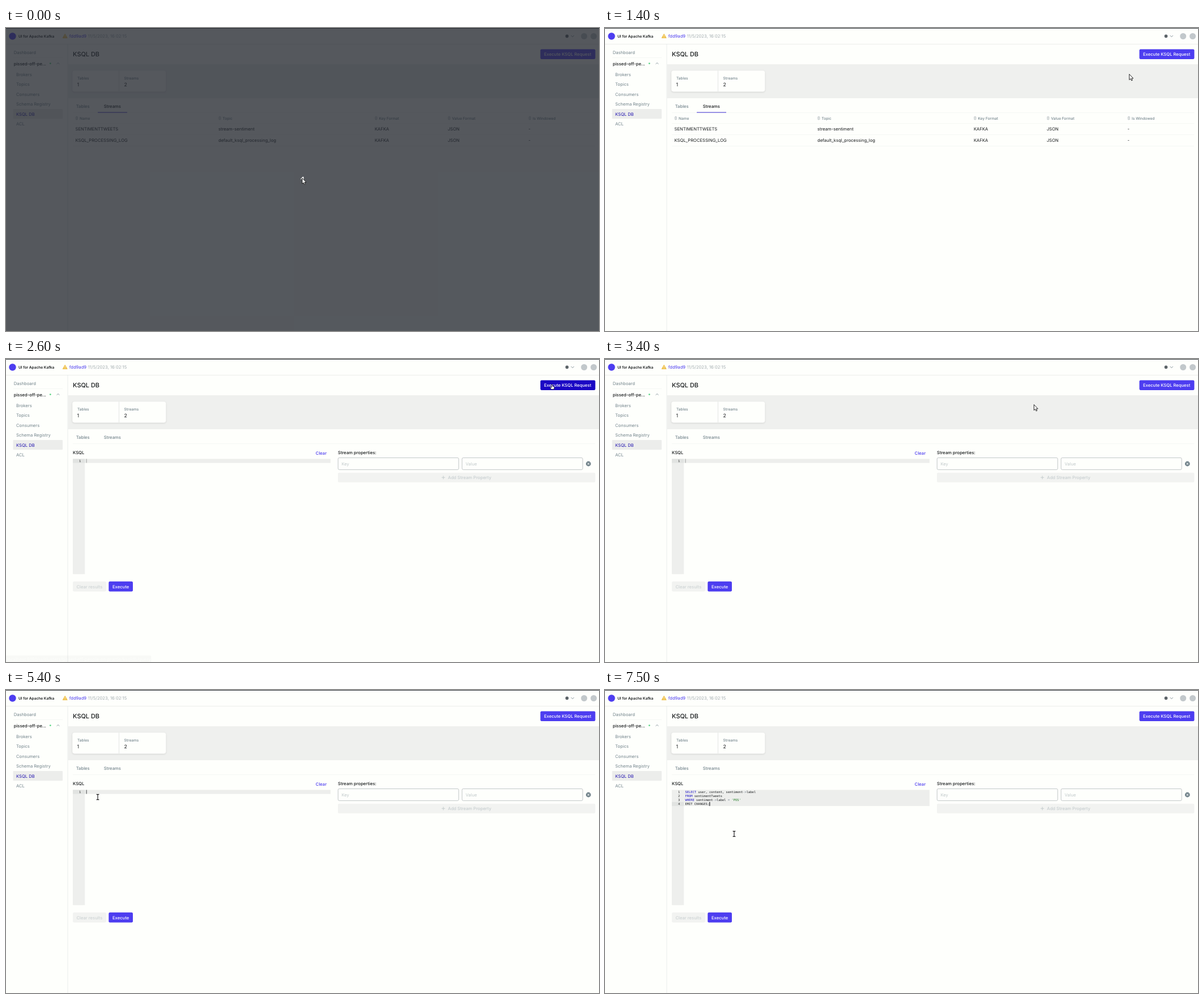
These frames come from a looping animation (1047x535 px, 8000 ms). An HTML page:

```html
<!DOCTYPE html>
<html lang="en">
<head>
<meta charset="utf-8">
<title>KSQL DB</title>
<style>
  html, body { margin: 0; width: 100%; height: 100%; overflow: hidden; background: #fefffc; }
  svg { display: block; width: 1047px; height: 535px; }
  text { font-family: Inter, sans-serif; text-rendering: geometricPrecision; white-space: pre; }
  .mono { font-family: "DejaVu Sans Mono", monospace; font-size: 5.46px; }
  .status { font-family: "Noto Sans", sans-serif; font-size: 7.9px; }
</style>
</head>
<body>
<svg id="stage" viewBox="0 0 1047 535" xmlns="http://www.w3.org/2000/svg"></svg>
<script>
const LOOP = 8000, STEP = 100, SCALE = 0.5453;
const INK = '#171a1c', GREY = '#73848c', BRAND = '#4d3df0', BRAND_DARK = '#1a08c4',
      PAPER = '#fefffc', PANEL = '#eff0ee', LINE = '#e6e9e8', FAINT = '#f1f3f1';

// px is the CSS size on the full-size page; cy is the middle of the capitals
const text = (x, cy, str, color = INK, px = 14, weight = 400) => {
  const size = px * SCALE;
  return `<text x="${x}" y="${(cy + size * 0.364).toFixed(2)}" font-size="${size.toFixed(2)}" font-weight="${weight}" fill="${color}">${str}</text>`;
};
const rect = (x, y, w, h, fill, r = 0, extra = '') =>
  `<rect x="${x}" y="${y}" width="${w}" height="${h}" rx="${r}" fill="${fill}" ${extra}/>`;
const circle = (x, y, r, fill) => `<circle cx="${x}" cy="${y}" r="${r}" fill="${fill}"/>`;
const path = (d, stroke, width = 0.8, fill = 'none', extra = '') =>
  `<path d="${d}" stroke="${stroke}" stroke-width="${width}" fill="${fill}" ${extra}/>`;
const group = (id, body) => `<g id="${id}">${body}</g>`;

function header() {
  return rect(0, 0, 1047, 1, '#34383c') +
    rect(0, 28, 1047, 0.8, LINE) +
    circle(11.5, 14.5, 6.2, BRAND) +
    text(22, 14.5, 'UI for Apache Kafka', INK, 12, 600) +
    path('M104.2 10.6L108.2 17.6H100.2Z', '#f0c24e', 1, '#f0c24e', 'stroke-linejoin="round"') +
    path('M104.2 12.7V15.2M104.2 16V16.8', PAPER, 0.8) +
    text(111.7, 14.7, 'fdd9ad9', BRAND) +
    text(144.7, 14.7, '11/5/2023, 16:02:15', '#a3acb0') +
    circle(990.5, 14.4, 2.8, '#5c6468') +
    path('M997.8 13.2L1000.3 15.7L1002.8 13.2', GREY, 0.9) +
    circle(1020.7, 14.5, 5.5, '#c2c8cb') +
    circle(1037.6, 14.5, 5.5, '#c2c8cb');
}

function sidebar() {
  const items = ['Brokers', 'Topics', 'Consumers', 'Schema Registry', 'KSQL DB', 'ACL'];
  return rect(108.6, 28, 0.8, 507, LINE) +
    text(13.7, 43, 'Dashboard', GREY) +
    rect(13, 52.2, 87, 0.6, FAINT) +
    text(13.7, 63, 'pissed-off-pe...', INK, 14, 500) +
    circle(78.3, 62.6, 1.4, '#5cd685') +
    path('M89.6 63.7L92 61.4L94.4 63.7', GREY, 0.8) +
    rect(12.5, 143, 87.5, 17.2, '#ecedeb', 1) +
    items.map((s, i) => text(18, 82 + i * 17.45, s, s === 'KSQL DB' ? '#1d0fae' : GREY)).join('');
}

function summary() {
  const shadow = 'filter="url(#shadow)"';
  return text(118, 46.3, 'KSQL DB', INK, 20, 500) +
    rect(943.5, 37.4, 97, 17.5, BRAND, 2.2, 'id="request"') +
    text(950, 46.4, 'Execute KSQL Request', '#fff', 14, 500) +
    rect(109.4, 64, 937.6, 60, PANEL) +
    rect(117.3, 75.2, 165, 37, PAPER, 4, shadow) +
    rect(199, 75.2, 1, 37, '#e4e6e4') +
    text(126, 88.5, 'Tables', GREY, 12, 500) + text(125.6, 99.6, '1', INK, 16) +
    text(208.6, 88.5, 'Streams', GREY, 12, 500) + text(208.6, 99.6, '2', INK, 16) +
    rect(118, 149, 922, 0.6, FAINT) +
    text(123.7, 138.6, 'Tables', GREY, 14, 500);
}

function table() {
  const columns = [
    [122.5, 'Name', 'SENTIMENTTWEETS', 'KSQL_PROCESSING_LOG'],
    [375, 'Topic', 'stream-sentiment', 'default_ksql_processing_log'],
    [651, 'Key Format', 'KAFKA', 'KAFKA'],
    [780, 'Value Format', 'JSON', 'JSON'],
    [922.5, 'Is Windowed', '-', '-']
  ];
  const sort = x => path(`M${x + 0.4} 158.1L${x + 2.4} 155.9L${x + 4.4} 158.1Z` +
    `M${x + 0.4} 160.1L${x + 2.4} 162.3L${x + 4.4} 160.1Z`, '#8d999e', 0.6);
  return text(172.8, 138.6, 'Streams', INK, 14, 500) +
    rect(162, 148.5, 52, 1.1, '#4a3bd6') +
    [168, 188.2, 208.4].map(y => rect(118, y, 922, 0.6, FAINT)).join('') +
    columns.map(([x, head, a, b]) => sort(x) +
      text(x + 7.6, 159.2, head, GREY, 12, 500) +
      text(x, 178.3, a) + text(x, 198.5, b)).join('');
}

function codeLine(i, parts) {
  const y = 181.9 + i * 7.09;
  const spans = parts.map(([s, color]) => `<tspan fill="${color}">${s}</tspan>`).join('');
  return `<text class="mono" x="141.4" y="${y}">${spans}</text>` + lineNumber(i);
}
const lineNumber = i =>
  `<text class="mono" x="132.3" y="${181.9 + i * 7.09}" text-anchor="end" fill="#222">${i + 1}</text>`;

function editor() {
  const word = '#1a10c8', op = '#687687';
  const query = [
    [['SELECT', word], [' user, content, sentiment', INK], ['-&gt;', op], ['label', INK]],
    [['FROM', word], [' sentimentTweets', INK]],
    [['WHERE', word], [' sentiment', INK], ['-&gt;', op], ['label ', INK], ['=', op], [" 'POS'", '#1c7a1f']],
    [['EMIT CHANGES;', INK]]
  ];
  return text(172.8, 138.6, 'Streams', GREY, 14, 500) +
    text(118, 164.8, 'KSQL', INK, 14, 500) +
    text(546.8, 165.8, 'Clear', BRAND, 14, 500) +
    rect(118, 176.4, 21.3, 203.4, '#eeefed') +
    rect(139.3, 176.4, 433.7, 7.1, '#edeeec', 0, 'id="active"') +
    group('empty', rect(118, 176.4, 21.3, 7.1, '#e1e3e1') + lineNumber(0)) +
    group('query', rect(118, 197.7, 21.3, 7.1, '#e1e3e1') + query.map((p, i) => codeLine(i, p)).join('')) +
    rect(0, 0, 0.8, 7, INK, 0, 'id="caret"') +
    rect(118, 392.8, 59, 17.6, '#f2f3f1', 2.2) +
    text(124.4, 402, 'Clear results', '#cdd3d4', 14, 500) +
    rect(181.3, 392.8, 42.7, 17.6, BRAND, 2.2) +
    text(188, 402, 'Execute', '#fff', 14, 500);
}

function properties() {
  const field = (x, hint) =>
    rect(x, 174.4, 213, 21, PAPER, 2.2, 'stroke="#b3b9bb" stroke-width=".8"') +
    text(x + 6.2, 185.2, hint, '#c1c9cb');
  return text(586, 164.8, 'Stream properties:', INK, 14, 500) +
    field(586.3, 'Key') + field(805.2, 'Value') +
    circle(1028.3, 185, 4.4, GREY) +
    path('M1026.6 183.3L1030 186.7M1030 183.3L1026.6 186.7', '#fff', 1) +
    rect(586, 200.7, 454.4, 17, '#f2f3f1', 2.2) +
    path('M769.2 209.2H775.2M772.2 206.2V212.2', '#c1c9cb', 0.9) +
    text(780.3, 209.4, 'Add Stream Property', '#c6cdcf', 14, 500);
}

function pointers() {
  const beam = 'M-2.3 -4.6H-.7L0 -4L.7 -4.6H2.3M0 -4V4M-2.3 4.6H-.7L0 4L.7 4.6H2.3';
  return group('arrow', path('M0 0V10L2.3 8L3.9 11.4L5.5 10.7L4 7.4H7Z', '#111', 0.9, '#fff', 'stroke-linejoin="round"')) +
    group('hand', path('M-.9 .4Q0 -.5 .9 .4V3.2L3.2 3.7Q4.2 4 4.1 5L3.5 8.6H-1.2L-3.2 5.4Q-3 4.2 -1.9 4.8L-.9 5.6Z',
      '#111', 0.7, '#fff', 'stroke-linejoin="round"')) +
    group('beam', path(beam, '#fff', 2.2) + path(beam, '#111', 1.1));
}

const stage = document.getElementById('stage');
stage.innerHTML =
  `<defs><filter id="shadow" x="-10%" y="-30%" width="120%" height="170%">
    <feDropShadow dx="0" dy="1" stdDeviation="1.6" flood-color="#000" flood-opacity=".14"/></filter></defs>` +
  rect(0, 0, 1047, 535, PAPER) + header() + sidebar() + summary() +
  group('table', table()) +
  group('form', editor() + properties()) +
  group('status', rect(-3, 523.4, 259.4, 15, '#2f3236', 2) +
    '<text class="status" x="1.5" y="532.6" fill="#f0f0f0">localhost:8080/ui/clusters/pissed-off-people-on-prattlo/ksqldb/query</text>') +
  group('dim', rect(0, 0, 1047, 535, 'rgba(38,42,49,.78)') +
    path('M519.8 267.2L523.6 262.8H525.6V268.5H523.4V266.2Z', 'none', 0, '#fff')) +
  pointers();

const el = {};
stage.querySelectorAll('[id]').forEach(n => el[n.id] = n);

// time, x, y of the pointer
const route = [
  [0, 523, 265], [600, 523, 265], [1500, 940, 75], [1600, 954, 53], [1900, 964, 45],
  [3100, 964, 45], [4000, 167, 182], [4100, 162, 189], [7100, 162, 189], [7500, 228, 254], [LOOP, 228, 254]
];
// time, opacity of the address bubble
const bubble = [[0, 0], [1700, 0.4], [1800, 0.8], [1900, 1], [2400, 0.65], [2500, 0.3], [2600, 0.025], [3200, 0]];
// time, opacity of the text caret
const blink = [[0, 0.45], [4500, 1], [5000, 0], [5400, 1], [6900, 0], [7400, 1]];

const held = (steps, t) => steps.filter(s => s[0] <= t).pop()[1];

function pointerAt(t) {
  const i = route.findIndex(p => p[0] > t);
  const [t0, x0, y0] = route[i - 1], [t1, x1, y1] = route[i];
  const u = (t - t0) / (t1 - t0), k = u * u * (3 - 2 * u);
  return [x0 + (x1 - x0) * k, y0 + (y1 - y0) * k];
}

const show = (node, on) => node.setAttribute('visibility', on ? 'inherit' : 'hidden');

function draw(time) {
  const t = Math.floor((time % LOOP) / STEP) * STEP;
  const [x, y] = pointerAt(t);
  const form = t >= 2400, typed = t >= 6200;
  const over = x > 943 && y > 37 && y < 55;
  const kind = over ? 'hand' : form && y > 177 ? 'beam' : 'arrow';

  for (const k of ['arrow', 'hand', 'beam']) {
    show(el[k], k === kind);
    el[k].setAttribute('transform', `translate(${x.toFixed(2)} ${y.toFixed(2)})`);
  }
  show(el.dim, t < 100);
  show(el.table, !form);
  show(el.form, form);
  show(el.empty, !typed);
  show(el.query, typed);
  el.request.setAttribute('fill', over ? BRAND_DARK : BRAND);
  el.active.setAttribute('height', typed ? 28.4 : 7.1);
  el.caret.setAttribute('x', typed ? 184.2 : 141.7);
  el.caret.setAttribute('y', typed ? 197.7 : 176.4);
  el.caret.setAttribute('width', typed ? 1.2 : 0.8);
  el.caret.setAttribute('opacity', held(blink, t));
  el.status.setAttribute('opacity', held(bubble, t));
}

const start = performance.now();
function tick() {
  draw(performance.now() - start);
  requestAnimationFrame(tick);
}
tick();
</script>
</body>
</html>
```
